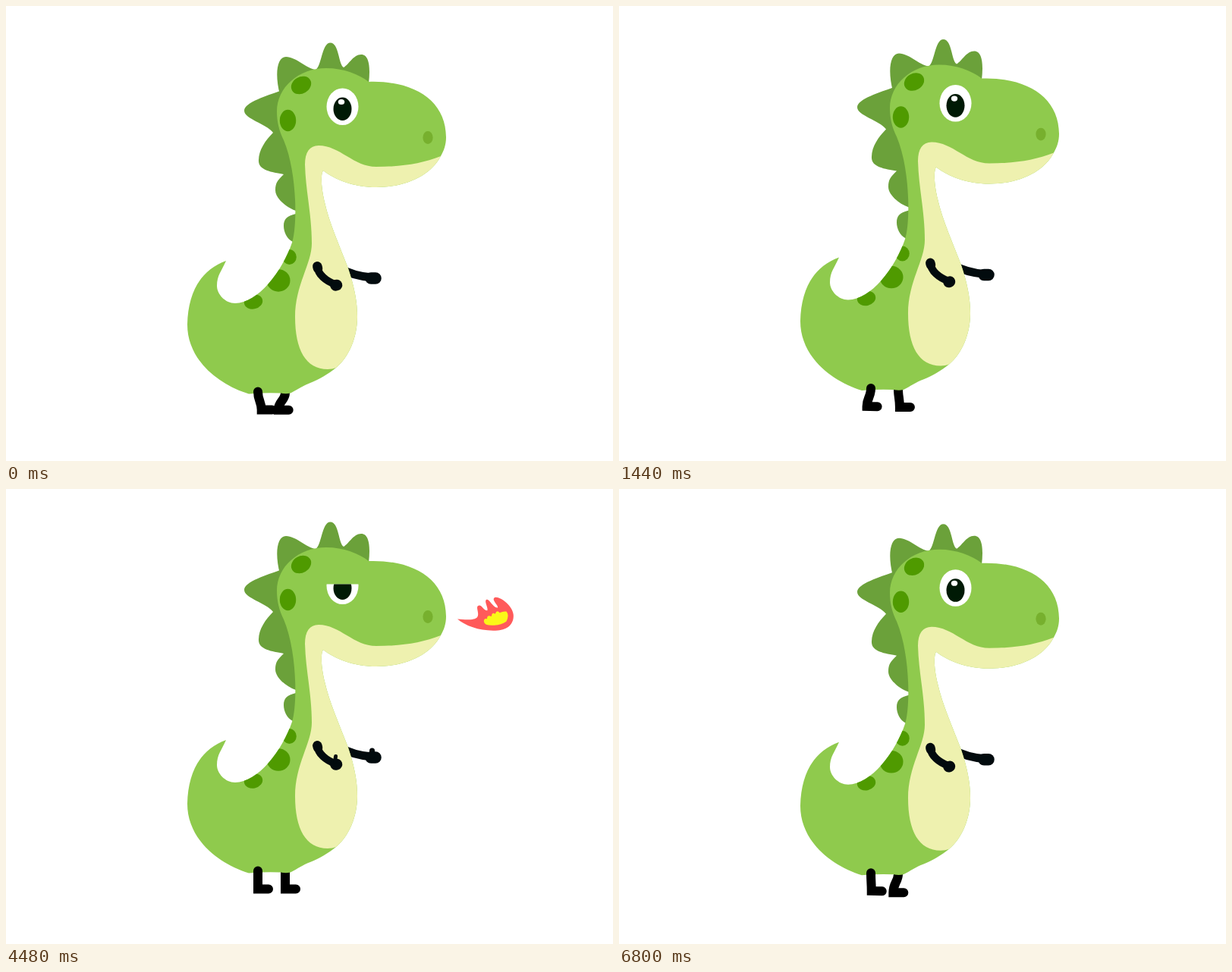
An HTML page for the animation above (6840 ms loop, 800 px wide and 600 px high).

```html
<!DOCTYPE html>
<html lang="en">
<head>
<meta charset="utf-8">
<title>Little dinosaur</title>
<style>
  html, body { margin: 0; width: 100%; height: 100%; overflow: hidden; background: #fff; }
  svg { display: block; width: 100vw; height: 100vh; }
  .limb { fill: none; stroke: #020b0e; stroke-linecap: round; }
  .leg { fill: none; stroke: #000; stroke-width: 12; stroke-linecap: round; }
</style>
</head>
<body>
<svg viewBox="0 0 800 600">
  <defs>
    <clipPath id="skin"><path class="body"/></clipPath>
    <clipPath id="lid"><rect id="opening" x="420" width="50"/></clipPath>
  </defs>
  <g id="dino">
    <path id="legR" class="leg"/>
    <g class="limb">
      <path d="M440 341Q458 351 482 353" stroke-width="11"/>
      <path d="M481 354H487" stroke-width="15.5"/>
      <path class="thumb" d="M482.5 352V345" stroke-width="7"/>
    </g>
    <path fill="#6ba13a" d="M361 112C354 85 357 62 369 62C382 62 395 77 408 79C416 75 416 43.5 427.5 43.5C439 43.5 438 72 445 76C452 72 458 59 468 59C480 59 480 80 478 97L400 130L385 306H378C370 302 366 293 366 285C366 276 370 272 382 269V265C368 260 355 248 355 238C355 228 358 225 366 217C350 214 332 212 333 198C333 185 342 172 352 162C343 150 314 144 314 133C314 122 345 113 361 107Z"/>
    <path class="body" fill="#8fca4d"/>
    <g fill="#4f9a00" clip-path="url(#skin)">
      <ellipse cx="389" cy="99.5" rx="13.8" ry="11" transform="rotate(-30 389 99.5)"/>
      <ellipse cx="371.5" cy="146" rx="10.7" ry="14.2"/>
      <ellipse cx="373.5" cy="326" rx="9.3" ry="10"/>
      <ellipse cx="359" cy="357" rx="15.5" ry="14.7"/>
      <ellipse cx="326" cy="385" rx="12.3" ry="9.6" transform="rotate(-12 326 385)"/>
    </g>
    <path fill="#eef1af" d="M573 193C548 203 520 207 488 207C458 207 440 179 412 179C400 179 394 188 394 204C395 240 403 270 403 308C403 335 381 363 381 405C381 448 395 474 424 474C428 474 432 473 435 472C452 458 463 432 463 405C463 385 459 365 451 341C440 312 426 281 420 254C416 238 414 218 418 212C434 224 458 234 488 234C528 234 560 218 573 193Z"/>
    <ellipse cx="556" cy="168.5" rx="6.6" ry="8.4" fill="#77b02e"/>
    <g clip-path="url(#lid)">
      <ellipse cx="443.5" cy="127.7" rx="21" ry="24.3" fill="#fff"/>
      <ellipse cx="443.5" cy="130.8" rx="12" ry="15.3" fill="#001a05"/>
      <ellipse cx="442" cy="121.5" rx="4.2" ry="3.6" fill="#fff"/>
    </g>
    <g class="limb">
      <path d="M410.5 338.5C411 349 422 358 434 362" stroke-width="10"/>
      <path d="M410.3 338.3L411 341" stroke-width="12.5"/>
      <path d="M434.5 363.5L436 363" stroke-width="14.5"/>
      <path class="thumb" d="M433.5 360L434.5 352.5" stroke-width="5"/>
    </g>
    <path id="legL" class="leg"/>
  </g>
  <g id="fire">
    <path fill="#ff5a5a" d="M595 171.5C609 174 618 174 621 171C625 167 620 158 623 156C628 153 630 163 635 163C637 160 631 150 635 148.5C639 147 643 161 649 160C650 157 642 150 645 147C650 143 669 158 669 171C669 183 660 190 647 190C625 190 606 182 595 171.5Z"/>
    <path fill="#fbf718" d="M629.5 177Q630 172 634 174Q634 168 640 171Q641 165 645 168Q648 162 651 167Q656 165 660 166Q664 171 659 179Q652 183 643 183Q630 183 629.5 177Z"/>
  </g>
</svg>
<script>
const LOOP = 6840, WALK_START = 6315 - LOOP, STRIDE = 400;
const $ = id => document.getElementById(id);
const each = (name, fn) => document.querySelectorAll('.' + name).forEach(fn);
const ramp = (t, a, b) => Math.min(1, Math.max(0, (t - a) / (b - a)));
const smooth = (t, a, b) => (1 - Math.cos(Math.PI * ramp(t, a, b))) / 2;
const rad = deg => deg * Math.PI / 180;

// k: 0 tail at rest, 1 tail pulled back
const bodyPath = k => `M422 77C445 77 465 85 478 95C538 93 580 120 580 168C580 178 577 186 573 193
  C560 218 528 234 488 234C458 234 434 224 418 212C414 218 416 238 420 254C426 281 440 312 451 341
  C459 365 463 385 463 405C463 432 452 458 435 472C425 480 412 488 401 492C392 495 384 501 375 505.5
  Q369 507 362 505.5Q342 504.5 320 506.5C280 494 239 462 239 415
  C240 372 ${257 - 4 * k} 343 ${290 - 12 * k} 331C${284 - 9 * k} 345 ${278 - 5 * k} 350 ${278 - 5 * k} 364
  C${278 - 5 * k} 375 ${289 - 3 * k} 387 302 387C332 387 364 345 377 307C384 285 384 215 366 172
  C360 160 357 148 357 134C357 103 385 77 422 77Z`;

function leg(el, x, y, dx, dy, tilt = 0) {
  const ankle = x + dx, sole = 527.6 + dy;
  el.setAttribute('d', `M${x} ${y}C${x} 515 ${ankle} 517 ${ankle} ${sole}L${ankle + 14} ${sole + tilt}`);
}

function draw(t) {
  // walk, running across the loop seam
  const w = t > 6000 ? t - LOOP : t;
  const phase = 2 * Math.PI * (w - WALK_START) / STRIDE;
  const walking = w >= WALK_START && w < 1875;
  const bob = walking ? 3.6 * (1 - Math.cos(phase)) : 0;
  const gait = w < 2000 ? smooth(w, WALK_START, WALK_START + 200) * (1 - smooth(w, 1850, 2000)) : 0;
  const hump = Math.max(0, Math.cos(phase - rad(30))) ** 2;
  $('dino').setAttribute('transform', `translate(0 ${bob})`);
  leg($('legL'), 332, 503.5, gait * (0.9 - 6.7 * Math.cos(phase + rad(12))), -gait * hump, gait * hump);
  leg($('legR'), 368, 505, gait * (-4 + 6 * Math.cos(phase + rad(40))), 4 * gait * hump);

  // tail
  const k = smooth(t, 2960, 3240) - smooth(t, 3240, 3520);
  each('body', el => el.setAttribute('d', bodyPath(k)));

  // eyelid and thumbs
  const shut = smooth(t, 2400, 2680) - smooth(t, 5320, 5520);
  const top = 103 + 22.5 * shut;
  $('opening').setAttribute('y', top);
  $('opening').setAttribute('height', 155 - top);
  const thumb = t < 6340 ? smooth(t, 2400, 2680) : 0;
  each('thumb', el => {
    el.style.display = thumb ? '' : 'none';
    el.setAttribute('transform', `translate(0 ${5 * (1 - thumb)})`);
  });

  // fire grows, flickers, rests, flickers and shrinks
  const size = Math.sin(Math.PI / 2 * ramp(t, 3520, 3800)) - smooth(t, 4720, 5000);
  const flicker = (t > 3760 && t < 4320) || (t > 4440 && t < 5000);
  const from = t < 4400 ? 3760 : 4440;
  const angle = flicker ? -5 * Math.sin(2 * Math.PI * (t - from) / 280) : 0;
  $('fire').style.display = size > 0.001 ? '' : 'none';
  $('fire').setAttribute('transform',
    `translate(595.5 171.5) rotate(${angle}) scale(${size}) translate(-595.5 -171.5)`);
}

let start;
function tick(now) {
  start ??= now;
  draw((now - start) % LOOP);
  requestAnimationFrame(tick);
}
draw(0);
requestAnimationFrame(tick);
</script>
</body>
</html>
```
